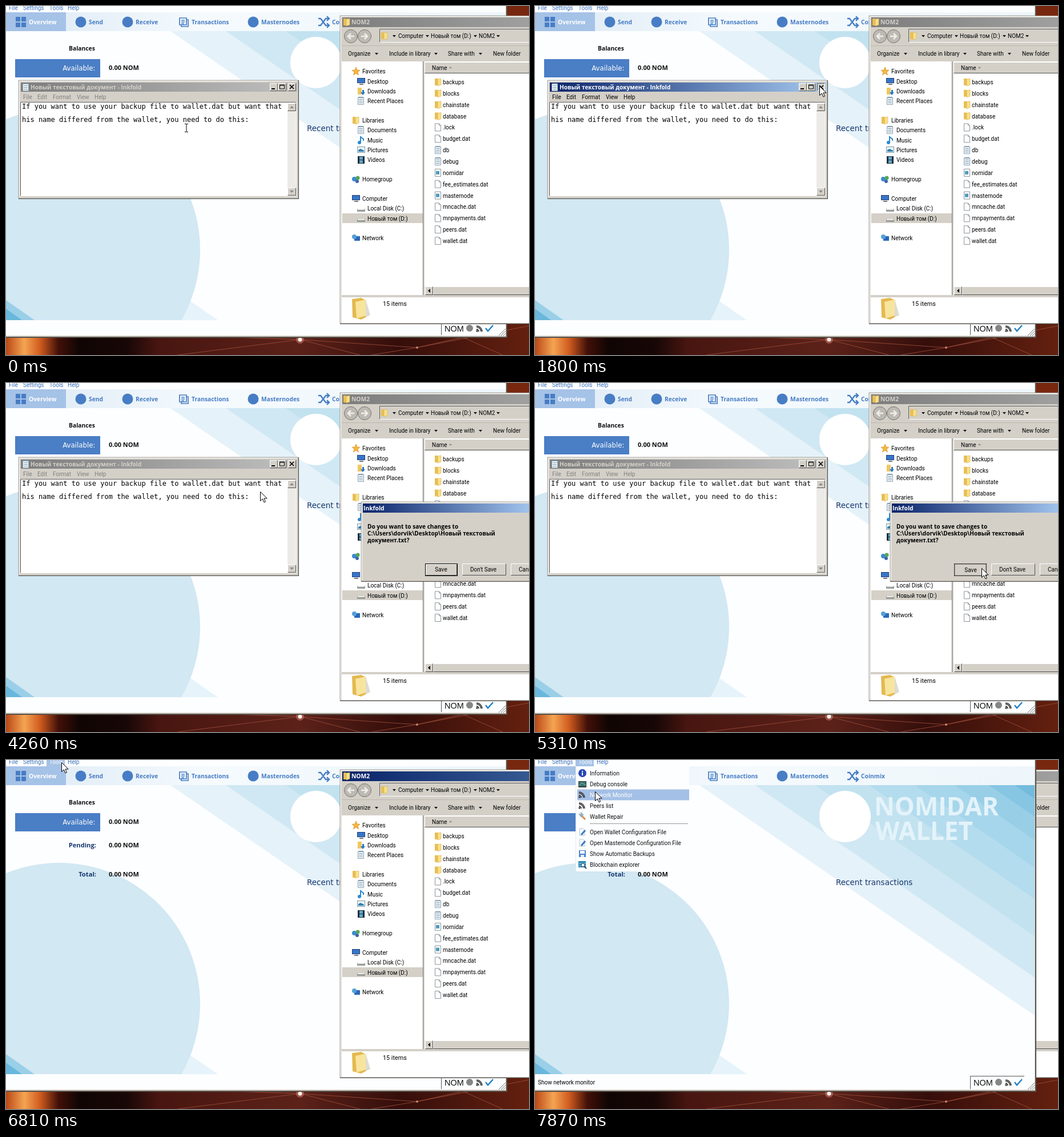
An HTML page that plays this animation: 916 px wide and 611 px high, repeating every 8 s.

```html
<!DOCTYPE html>
<html lang="en">
<head>
<meta charset="utf-8">
<style>
html, body { margin: 0; width: 100%; height: 100%; overflow: hidden; background: #1a0705; }
svg { display: block; }
text { font: 10px Roboto, "Liberation Sans", sans-serif; white-space: pre; }
.b { font: bold 10.3px "Open Sans", "Noto Sans", sans-serif; }
.v { font: 11.8px "DejaVu Sans", sans-serif; }
.m { font: 12px "DejaVu Sans Mono", monospace; }
.big { font: bold 44px "Open Sans", "Noto Sans", sans-serif; }
</style>
</head>
<body>
<svg id="stage" width="916" height="611" viewBox="0 0 916 611"></svg>
<script>
const FACE = '#d4d0c8', BLUE = '#477dc4', PALE = '#a5c2e7', NAVY = '#17366d';

const rect = (x, y, w, h, fill, more = '') =>
  `<rect x="${x}" y="${y}" width="${w}" height="${h}" fill="${fill}" ${more}/>`;
const path = (d, fill = 'none', stroke = 'none', width = 1) =>
  `<path d="${d}" fill="${fill}" stroke="${stroke}" stroke-width="${width}"/>`;
const disc = (x, y, r, fill, more = '') => `<circle cx="${x}" cy="${y}" r="${r}" fill="${fill}" ${more}/>`;
const text = (x, y, s, fill = '#000', cls = '', more = '') =>
  `<text x="${x}" y="${y}" fill="${fill}" class="${cls}" ${more}>${s}</text>`;
const group = (id, body) => `<g id="${id}">${body}</g>`;
const at = (x, y, body) => `<g transform="translate(${x} ${y})">${body}</g>`;
const gradient = (id, stops) => `<linearGradient id="${id}">` +
  stops.map(([o, c]) => `<stop offset="${o}" stop-color="${c}"/>`).join('') + '</linearGradient>';

// Classic raised or sunken box
function bevel(x, y, w, h, sunken, fill = FACE) {
  const [a, b] = sunken ? ['#606060', '#fff'] : ['#fff', '#505050'];
  return rect(x, y, w, h, fill) +
    path(`M${x + .5} ${y + h - .5}V${y + .5}H${x + w - .5}`, 'none', a) +
    path(`M${x + .5} ${y + h - .5}H${x + w - .5}V${y + .5}`, 'none', b);
}
const frame = (x, y, w, h) => rect(x, y, w, h, '#404040') + rect(x, y, w - 1, h - 1, FACE) +
  rect(x, y, w - 1, h - 1, 'none', 'stroke="#77736c" stroke-opacity=".55"') +
  path(`M${x + 1.5} ${y + h - 3}V${y + 1.5}H${x + w - 3}`, 'none', '#fff');

const icons = {
  folder: path('M1-6h5l1 2v10H1z', '#e9bf52') + path('M6-5l6-1v11l-6 2z', '#f8e08a', '#d5ad4b', .6),
  file: path('M1.5-6.5h7l3 3v10h-10z', '#fff', '#8d9499') + path('M8.5-6.5v3h3', 'none', '#8d9499'),
  note: path('M1.5-5.5h10v12h-10z', '#f4f9fc', '#8b9fb0') + path('M3-2.5h7M3 .5h7M3 3.5h7M2-6.5h9', 'none', '#7795aa'),
  conf: path('M1.5-6.5h10v13h-10z', '#fff', '#84969f') + rect(3, -3, 6, 6, '#4e9cba'),
  screen: rect(0, -6, 14, 9, '#233e78') + rect(1, -5, 12, 7, '#3776c8') + rect(4, 4, 7, 2, '#777'),
  star: path('M7-7l2 5 5 .4-4 3.4 1.5 5L7 4 2.5 6.8 4 1.8 0-1.6l5-.4z', '#f5b63f', '#d78a25', .7),
  down: path('M1-6h7v12H1z', '#edc860') + path('M9-2v4H6l4 5 4-5h-2v-4z', '#2775cf'),
  music: path('M6 4V-6l5 4v3', 'none', '#2a88d0', 2) + disc(4, 4, 3, '#2a88d0'),
  photo: rect(.5, -5.5, 13, 10, '#e8f5fb', 'stroke="#7d969f"') + path('M2 3V0l4-2 6 3v2z', '#367fae'),
  film: rect(1, -6, 12, 13, '#232b34') + rect(4, -5, 6, 5, '#5ba9d0') + rect(4, 1, 6, 5, '#5ba9d0'),
  group: disc(4, 0, 4, '#3b8ad0') + disc(10, -2, 3.5, '#55a65a') + disc(9, 4, 3, '#3b65a9'),
  drive: rect(0, 1, 14, 5, '#9a9b9b') + rect(1, 1, 12, 2, '#ececec') + rect(10, 4, 2, 1, '#5ba63e'),
  net: rect(4, -3, 10, 8, '#2968bd') + disc(4, -2, 4, '#54a1d6'),
  sig: [4, 8].map(r => path(`M1 ${5 - r}a${r} ${r} 0 0 1 ${r} ${r}`, 'none', '#454545', 1.8)).join('') +
    path('M1-5a10 10 0 0 1 10 10', 'none', '#454545', 1.5) + disc(2, 4, 1.8, '#454545'),
  info: disc(7, 0, 7, '#2847b4') + rect(6, -1, 2, 5, '#fff') + rect(6, -4, 2, 2, '#fff'),
  shell: rect(0, -5, 14, 11, '#343f43') + path('M1-4h12v8H1z', '#39736f') + path('M1 3l5-5 7 4', 'none', '#7cbcb0'),
  tool: path('M3-4l9 9', 'none', '#d98f3c', 3) + path('M1-5l4 5 3-3-4-4', 'none', '#7db3d7', 2),
  edit: path('M2-6h6l3 3v9H2z', '#f7fafc', '#b5c4cf') + path('M5 5l7-8', 'none', '#347bcb', 3),
  disk: rect(1, -6, 12, 12, '#4a83cc') + rect(3, -5, 8, 5, '#fff') + rect(4, 2, 6, 4, '#dfe9f4'),
  look: rect(0, -6, 13, 11, '#2c8ab6') + path('M1-2h11M1 2h11', 'none', '#a4dceb') +
    disc(8, 1, 3, '#f1f6fa', 'stroke="#345"') + path('M10 3l4 4', 'none', '#345', 2)
};
const icon = (name, x, y) => at(x, y, icons[name]);

const defs = '<defs>' +
  gradient('sky', [[0, '#b94817'], [.035, '#f5a452'], [.065, '#d05c20'], [.1, '#421008'], [.14, '#100504'],
    [.23, '#170706'], [.29, '#481510'], [.56, '#5c2219'], [.75, '#350e0b'], [1, '#64200f']]) +
  gradient('bar', [[0, '#dce9f5'], [.4, '#f5fafd'], [1, '#edf6fb']]) +
  gradient('off', [[0, '#7d7d7d'], [1, '#c0c0c0']]) +
  gradient('on', [[0, '#0a246a'], [1, '#a6caf0']]) +
  gradient('exOff', [[0, '#7d7d7d'], [1, '#a0a0a0']]) +
  gradient('exOn', [[0, '#0a246a'], [1, '#355991']]) +
  gradient('dlg', [[0, '#0a246a'], [1, '#a0c3ec']]) +
  '<clipPath id="right"><rect x="878" y="0" width="38" height="611"/></clipPath></defs>';

function wallpaper() {
  return rect(0, 0, 916, 611, 'url(#sky)') + rect(876, 0, 40, 18, '#78270f') +
    path('M300 611L515 584L620 611M515 584L720 598L916 560M640 611L720 598L800 580L870 611M400 580L515 584', 'none', '#a0503b', .8) +
    disc(515, 584, 7, '#c87568', 'opacity=".6"') + disc(515, 584, 3.5, '#fff0ed') + disc(720, 598, 2, '#c68370');
}

function wallet() {
  const bands = [[288, '#e5f2f9'], [385, '#d0e8f3'], [490, '#c2e2f0'], [585, '#b3dcee'],
    [665, '#a6d6eb'], [735, '#98cfe7'], [795, '#87c6e3'], [840, '#73bbdd']];
  const diagonals = bands.map(([x, c]) =>
    path(`M${x} 44H875V${44 + (875 - x) * .687}z`, c)).join('');
  const tabs = [['Overview', 40, '#fff'], ['Send', 145], ['Receive', 227], ['Transactions', 325], ['Masternodes', 447], ['Coinmix', 571]];
  const rows = [['Pending:', 153], ['Total:', 204]];
  return rect(0, 0, 878, 581, '#57514b') + rect(0, 0, 876, 579, FACE) + rect(0, 0, 875, 577, '#fdfeff') +
    rect(0, 11, 875, 33, 'url(#bar)') + rect(0, 11, 105, 33, PALE) + diagonals +
    path('M0 294L371 550H0z', '#e6f3fa') +
    '<svg y="44" width="875" height="506" viewBox="0 44 875 506">' + disc(93, 427, 247, '#d2e8f3') + '</svg>' +
    path('M0 515L50 550H0z', '#9acfe8') + path('M0 530L28 550H0z', '#69b7dc') +
    [['File', 5], ['Settings', 30], ['Tools', 76], ['Help', 108]].map(([s, x]) => text(x, 7, s, '#3d72bb')).join('') +
    group('toolsOn', rect(71, 0, 32, 11, PALE) + text(76, 7, 'Tools', '#fff')) +
    tabs.map(([s, x, c = BLUE]) => text(x, 32, s, c, 'b')).join('') +
    [17, 27].map(x => rect(x, 19, 8, 8, BLUE) + rect(x, 29, 8, 8, BLUE)).join('') +
    [131, 213, 433].map(x => disc(x, 28, 9.5, BLUE)).join('') +
    path('M304 21h12v12h-12zM307 33v3h12V24h-3M307 25h6M307 28h6M307 31h5', 'none', BLUE, 1.7) +
    path('M547 22h4l9 12h6M547 34h4l9-12h6M562 18l4 4-4 4M562 30l4 4-4 4', 'none', BLUE, 2.3) +
    text(110, 78, 'Balances', '#111', 'b') +
    rect(16, 93, 149, 32, '#4a7ec5') + text(156.5, 113, 'Available:', '#fff', 'v', 'text-anchor="end"') +
    rows.map(([s, y]) => text(158, y, s, NAVY, 'b', 'text-anchor="end" style="font-size:11.2px"')).join('') +
    [112, 153, 204].map(y => text(180, y, '0.00 NOM', '#111', 'b', 'style="font-size:11px"')).join('') +
    disc(543, 99, 45, '#fff') +
    text(594, 97, 'NOMIDAR', '#e4f3fa', 'big') + text(596, 140, 'WALLET', '#e4f3fa', 'big') +
    text(527, 219, 'Recent transactions', NAVY, 'v', 'style="font-size:13.5px"') +
    path('M762.5 576V553.5H857', 'none', '#555') +
    text(768, 570, 'NOM', '#111', '', 'style="font:14.5px \'Liberation Sans\',sans-serif"') +
    disc(812, 564, 6, '#858585') + at(823, 565, icons.sig) +
    path('M840 564l4 5 9-10', 'none', '#2482c5', 2.5) +
    path('M863 577l12-12M867 577l8-8M871 577l4-4', 'none', '#777') +
    '<text id="tip" x="5" y="568"></text>';
}

function menu() {
  const items = [['Information', 'info', 23], ['Debug console', 'shell', 42], ['Network Monitor', 'sig', 61],
    ['Peers list', 'sig', 80], ['Wallet Repair', 'tool', 99], ['Open Wallet Configuration File', 'edit', 126],
    ['Open Masternode Configuration File', 'edit', 145], ['Show Automatic Backups', 'disk', 164], ['Blockchain explorer', 'look', 183]];
  return rect(71, 11, 199, 184, '#fdfeff') + rect(71, 11, 1, 184, '#e3e8ec') +
    '<rect id="pick" x="74" width="196" height="19" fill="#a5c0e6"/>' +
    path('M96 111.5H268', 'none', '#999') +
    items.map(([s, i, y]) => icon(i, 76, y) + text(96, y + 4, s, '#111', 'item')).join('');
}

function explorer() {
  const side = [['Favorites', 'star', 114], ['Desktop', 'screen', 132, 1], ['Downloads', 'down', 149, 1], ['Recent Places', 'note', 166, 1],
    ['Libraries', 'folder', 200], ['Documents', 'note', 217, 1], ['Music', 'music', 235, 1], ['Pictures', 'photo', 252, 1], ['Videos', 'film', 269, 1],
    ['Homegroup', 'group', 303], ['Computer', 'screen', 337], ['Local Disk (C:)', 'drive', 354, 1], ['Новый том (D:)', 'drive', 372, 1], ['Network', 'net', 406]];
  const files = ['backups', 'blocks', 'chainstate', 'database', '.lock', 'budget.dat', 'db', 'debug', 'nomidar',
    'fee_estimates.dat', 'masternode', 'mncache.dat', 'mnpayments.dat', 'peers.dat', 'wallet.dat'];
  const kind = (s, i) => i < 4 ? 'folder' : /^d/.test(s) ? 'note' : /nomidar|node/.test(s) ? 'conf' : 'file';
  const arrow = (x, y) => path(`M${x} ${y}h6l-3 3.5z`, '#111');
  return frame(585, 17, 360, 540) +
    rect(589, 20, 330, 17, 'url(#exOff)', 'id="exTitle"') + icon('folder', 590, 28) +
    '<text id="exName" x="605" y="32" class="b">NOM2</text>' +
    [604, 628].map((x, i) => disc(x, 53, 11.5, '#bdbab4', 'stroke="#77746f"') +
      path(i ? 'M622 53h11m-5-5l5 5-5 5' : 'M610 53h-11m5-5l-5 5 5 5', 'none', '#efeeeb', 2.5)).join('') +
    bevel(654, 40, 270, 24, true) + icon('folder', 656, 52) +
    [677, 735, 819, 859].map(x => arrow(x, 51)).join('') +
    text(687, 56, 'Computer') + text(744, 56, 'Новый том (D:)') + text(828, 56, 'NOM2') +
    path('M588 69.5H916', 'none', '#bbb7af') +
    [['Organize', 599], ['Include in library', 671], ['Share with', 774], ['New folder', 853]].map(([s, x]) => text(x, 87, s)).join('') +
    [646, 750, 828].map(x => arrow(x, 82)).join('') +
    rect(588, 97, 142, 410, '#fff') + rect(730, 97, 1, 410, '#777') +
    rect(589, 363, 141, 17, FACE) +
    side.map(([s, i, y, deep]) => icon(i, deep ? 615 : 606, y) + text(deep ? 633 : 624, y + 4, s)).join('') +
    rect(733, 97, 183, 410, '#fff') + bevel(733, 98, 200, 20) + text(746, 112, 'Name') + path('M776 109h5l-2.5-3z', '#8b8780') +
    files.map((s, i) => icon(kind(s, i), 750, 133 + i * 19.86) + text(765, 137 + i * 19.86, s)).join('') +
    rect(733, 491, 183, 15, '#e9e7e3') + bevel(734, 491, 14, 15) + path('M743 495v7l-4-3.5z', '#000') + bevel(748, 491, 190, 15) +
    rect(587, 506, 330, 4, FACE) + rect(588, 510, 328, 45, '#fff') +
    path('M606 513l16-2 8 4v30l-8 4-15-4z', '#e4b951') + path('M612 518l18-4v28l-16 5z', '#f8e59d') + path('M630 514l8 27-8 4z', '#dedbd2') +
    text(660, 525, '15 items', '#000', '', 'style="font-size:10.8px"');
}

function editor() {
  const thumb = (y, d) => bevel(493, y, 15, 14) + path(d, '#888');
  const labels = [['File', 30], ['Edit', 55], ['Format', 82], ['View', 124], ['Help', 155]];
  return frame(22, 130, 491, 208) + rect(26, 134, 484, 16, 'url(#off)', 'id="edTitle"') +
    icon('note', 28, 142) +
    '<text id="edName" x="43" y="146" class="b" style="font-size:10.1px">Новый текстовый документ - Inkfold</text>' +
    bevel(462, 135, 14, 14) + rect(465, 144, 6, 2, '#000') +
    bevel(476, 135, 15, 14) + path('M479.5 138h8v7h-8zM479 139h9', 'none', '#000') +
    group('close', bevel(494, 135, 14, 14) + path('M497 138l7 7m0-7l-7 7', 'none', '#000', 1.6)) +
    group('closeDown', bevel(494, 135, 14, 14, true) + path('M498 139l7 7m0-7l-7 7', 'none', '#000', 1.6)) +
    group('edMenu', labels.map(([s, x]) => `<text x="${x}" y="163">${s}</text>`).join('')) +
    bevel(25, 168, 484, 165, true, '#fff') + rect(493, 170, 15, 162, '#eceae6') +
    thumb(170, 'M497 179h7l-3.5-4z') + thumb(318, 'M497 323h7l-3.5 4z') +
    text(28, 180, 'If you want to use your backup file to wallet.dat but want that', '#000', 'm') +
    text(28, 203, 'his name differed from the wallet, you need to do this:', '#000', 'm');
}

function dialog() {
  const lines = ['Do you want to save changes to', 'C:\\Users\\dorvik\\Desktop\\Новый текстовый', 'документ.txt?'];
  return frame(622, 208, 330, 140) + rect(625, 211, 291, 16, 'url(#dlg)') +
    text(626, 223, 'Inkfold', '#fff', 'b') +
    lines.map((s, i) => text(633, 255 + i * 12, s, '#000', 'b', 'style="font-size:10.1px"')).join('') +
    rect(734, 316, 57, 22, '#000') + group('save', bevel(735, 317, 55, 20)) +
    group('saveDown', rect(735, 317, 55, 20, FACE, 'stroke="#77736c"')) +
    '<text id="saveText" text-anchor="middle">Save</text>' +
    bevel(799, 316, 77, 21) + text(813, 330, "Don't Save") +
    bevel(884, 316, 77, 21) + text(898, 330, 'Cancel');
}

const stage = document.getElementById('stage');
stage.innerHTML = defs + wallpaper() + group('wallet', wallet()) + group('explorer', explorer()) +
  group('editor', editor()) + group('dialog', dialog()) + group('menu', menu()) +
  group('arrow', path('M.5.5v16l3.8-3.6 2.7 6 2.5-1-2.6-5.9h5.3z', '#fff', '#000')) +
  group('beam', path('M-3-6.5h2.5l.5.5.5-.5H3M0-6V7M-3 7.5h2.5L0 7l.5.5H3', 'none', '#000'));

const el = {};
stage.querySelectorAll('[id]').forEach(e => el[e.id] = e);
const items = stage.querySelectorAll('.item');

// Pointer samples: time, x, y
const track = [[0, 316, 213], [120, 330, 206], [270, 372, 186], [420, 425, 163], [570, 470, 147], [720, 493, 141], [870, 498, 140],
  [3200, 460, 130], [3350, 360, 108], [3500, 295, 101],
  [3960, 303, 106], [4110, 350, 135], [4260, 445, 190], [4410, 565, 249], [4560, 685, 295], [4710, 762, 315], [4860, 792, 318],
  [5010, 786, 322], [5160, 782, 324], [5610, 775, 342], [5760, 735, 382], [5910, 640, 391],
  [6060, 480, 325], [6210, 330, 215], [6360, 210, 105], [6510, 140, 38], [6660, 108, 9], [6810, 97, 4],
  [7570, 98, 18], [7720, 102, 38], [7870, 105, 55]];
const tips = ['Show diagnostic information', 'Open debugging console', 'Show network monitor'];

const show = (id, on) => el[id].style.display = on ? '' : 'none';
const fill = (id, color) => el[id].setAttribute('fill', color);

function draw(now) {
  const t = now % 8000;
  const [, x, y] = track.findLast(k => k[0] <= t);
  const edOn = t >= 1800 && t < 2890;
  const saving = t >= 5310;
  const saved = t >= 5460;
  const exOn = saved && t < 7110;
  const pick = t >= 7870 ? 2 : t >= 7720 ? 1 : t >= 7570 ? 0 : -1;

  show('beam', t < 420);
  show('arrow', t >= 420);
  for (const id of ['beam', 'arrow']) el[id].setAttribute('transform', `translate(${x} ${y})`);

  show('editor', !saved);
  fill('edTitle', edOn ? 'url(#on)' : 'url(#off)');
  fill('edName', edOn ? '#fff' : FACE);
  fill('edMenu', edOn ? '#000' : '#808080');
  show('close', !edOn);
  show('closeDown', edOn);

  show('dialog', t >= 2890 && !saved);
  show('save', !saving);
  show('saveDown', saving);
  el.saveText.setAttribute('x', saving ? 763 : 762);
  el.saveText.setAttribute('y', saving ? 331 : 330);

  fill('exTitle', exOn ? 'url(#exOn)' : 'url(#exOff)');
  fill('exName', exOn ? '#fff' : FACE);
  el.explorer.setAttribute('clip-path', t >= 6960 ? 'url(#right)' : 'none');

  show('toolsOn', t >= 6660);
  show('menu', t >= 6960);
  show('pick', pick >= 0);
  el.pick.setAttribute('y', 13.5 + 19 * Math.max(pick, 0));
  items.forEach((e, i) => e.setAttribute('fill', i === pick ? '#fff' : '#111'));
  el.tip.textContent = tips[pick] || '';
}

const start = performance.now();
function tick() {
  draw(performance.now() - start);
  requestAnimationFrame(tick);
}
tick();
</script>
</body>
</html>
```
